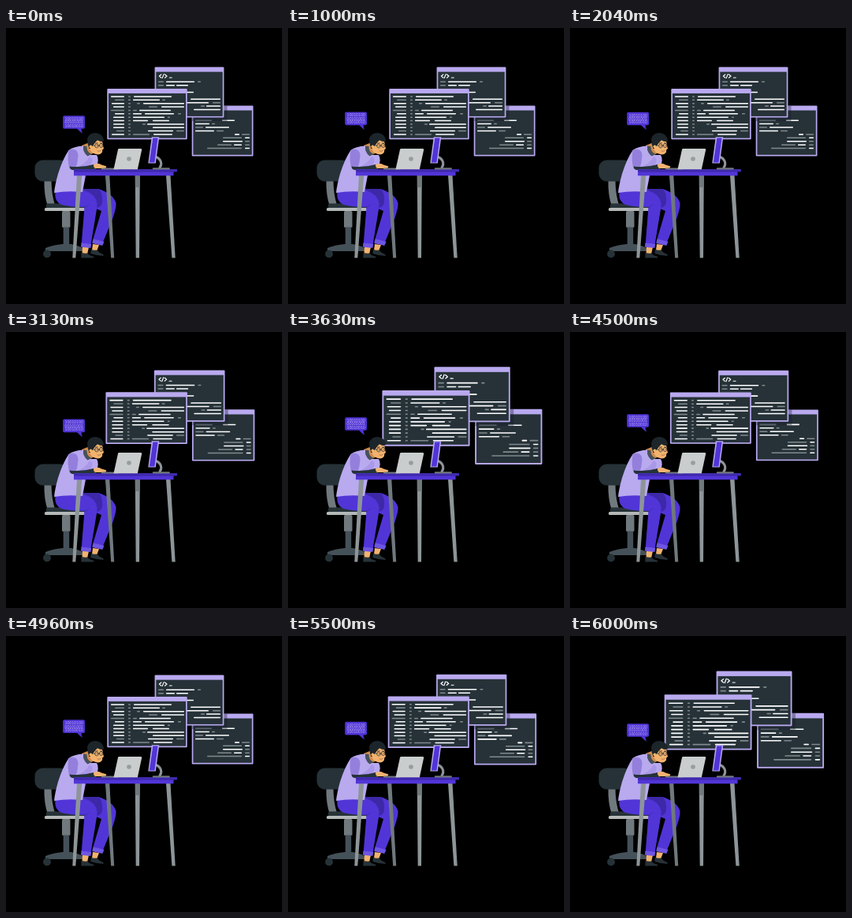
An HTML page with a canvas that plays this animation: 350 px wide and 350 px high, repeating every 6040 ms.

```html
<!DOCTYPE html>
<html lang="en">
<head>
<meta charset="utf-8">
<title>Coder at a desk</title>
<style>
  html, body { margin: 0; width: 100%; height: 100%; overflow: hidden; background: #000; }
  canvas { display: block; width: 350px; height: 350px; }
</style>
</head>
<body>
<canvas id="stage"></canvas>
<script>
const LOOP = 6040;
const canvas = document.getElementById('stage');
const ctx = canvas.getContext('2d');
const dpr = window.devicePixelRatio || 1;
canvas.width = canvas.height = Math.round(350 * dpr);

const C = {
  lilac: '#b9a9ef', lilacDark: '#9480dc', violet: '#5135d7', violetDark: '#3d28a8',
  dark: '#263238', slate: '#455159', steel: '#70797d', grey: '#8d9598',
  pale: '#c9cdcd', skin: '#f2b36e', skinDark: '#d28c50', hair: '#1c252a',
  white: '#ffffff', dim: '#80898d'
};

function shape(path, color) {
  ctx.fillStyle = color;
  ctx.fill(new Path2D(path));
}

function stroke(path, color, width) {
  ctx.strokeStyle = color;
  ctx.lineWidth = width;
  ctx.lineCap = ctx.lineJoin = 'round';
  ctx.stroke(new Path2D(path));
}

function box(x, y, w, h, r, color) {
  ctx.beginPath();
  ctx.roundRect(x, y, w, h, r);
  ctx.fillStyle = color;
  ctx.fill();
}

function dot(x, y, r, color) {
  ctx.beginPath();
  ctx.arc(x, y, r, 0, Math.PI * 2);
  ctx.fillStyle = color;
  ctx.fill();
}

// Each row lists dashes as "from-to"; a leading "g" makes the dash grey.
function dashes(rows, top, step) {
  rows.forEach((row, i) => {
    const y = top + i * step;
    for (const part of row.split(' ').filter(Boolean)) {
      const grey = part[0] === 'g';
      const [a, b] = part.replace('g', '').split('-').map(Number);
      stroke(`M${a + .7} ${y}H${b - .7}`, grey ? C.dim : C.white, 1.5);
    }
  });
}

function pane(x, y, w, h) {
  box(x, y, w, h, 1, C.lilac);
  ctx.fillStyle = C.dark;
  ctx.fillRect(x + 1.7, y + 6, w - 3.4, h - 7.7);
}

const listing = [
  '133-150 162-210',
  'g138-150 161-195 g198-202',
  '134-150 g166-170 174-226',
  '136-150 g181-192 197-226',
  'g133-150 g161-166 169-209',
  '138-150 161-172 176-213 g218-222',
  '136-150 161-201 g205-208',
  '136-150 161-180 186-207',
  '136-150 g173-177 179-226',
  '136-150 186-226',
  'g140-150 180-212 g216-226',
  '134-150 g161-182 187-211'
].map(row => row + ' g155-158');

const markup = [
  'g193-200 203-239 g243-247',
  'g193-200 203-214 216-231',
  '',
  '203-238',
  '',
  '234-272',
  '220-257 g262-272',
  'g247-252 254-272',
  '238-272'
];

const output = [
  'g240-261 274-290',
  '240-258 g261-265',
  'g240-250 253-283',
  '240-264 g267-276',
  'g290-296 g299-309 290-296',
  'g275-299 303-309',
  '275-300 g303-309',
  'g268-286 289-299 g303-309',
  'g255-299 303-309'
];

function drawPanes(scale) {
  ctx.save();
  ctx.translate(221, 106);
  ctx.scale(scale, scale);
  ctx.translate(-221, -106);

  pane(235.7, 98.5, 77.8, 64);
  dashes(output, 117.2, 4.42);
  ctx.fillStyle = 'rgba(20,24,40,.35)';
  ctx.fillRect(236, 98.5, 44.5, 19.5);

  pane(188.6, 49.6, 87.8, 64);
  stroke('M196.8 59l-2.4 2l2.4 2M201.6 59l2.4 2l-2.4 2M200.1 58.6l-1.8 4.8', C.white, 1.2);
  stroke('M207.3 63h3', C.white, 1);
  dashes(markup, 68.3, 4.4);

  pane(128.3, 76.9, 101.4, 64.4);
  dashes(listing, 87, 4.36);
  ctx.restore();
}

function drawBubble(dy) {
  ctx.save();
  ctx.translate(0, dy);
  box(72.2, 111.2, 27.8, 16.6, 1.8, C.violet);
  shape('M89.5 127Q93 131 97 133.8Q95.3 130.5 95.6 127Z', C.violet);
  ctx.fillStyle = C.lilac;
  ctx.font = '5px Lato, sans-serif';
  ctx.textAlign = 'center';
  ctx.textBaseline = 'alphabetic';
  ['10010100', '00101001', '10010010'].forEach((s, i) => ctx.fillText(s, 86.1, 117 + i * 4.35));
  ctx.restore();
}

function drawChair() {
  shape('M48.5 192H57.5Q57.5 211 62.5 226H53Q48 212 48.5 192Z', C.steel);
  box(36.5, 167.5, 42, 27, 10, C.dark);
  box(51, 222.5, 49, 6, 2, C.dark);
  box(49, 228, 51, 4, 1.5, '#b4b8b8');
  box(71, 232, 10.5, 21, 1.5, C.steel);
  box(72.7, 252.5, 7.5, 23, 0, C.slate);
  shape('M50 283V279Q60 275 72 274H82Q92 276 97 279V283Z', C.slate);
  dot(52, 286.5, 4.9, C.dark);
}

function drawLegs() {
  // far leg
  shape('M110 274L109 282L115 283L118 275Z', C.skin);
  shape('M108 280.5Q111 282.5 115 281.5Q118 285 123.5 287.3V289Q116 289 107.3 286Z', C.dark);
  shape('M94 204H117Q136 210 139.5 222Q140 228 135 242L122 274L109.5 271L121 232L98 222Z', C.violet);
  shape('M95 204H118Q123 211 122 221Q121 227 115 228L98 219Z', C.violetDark);
  shape('M110.8 267.5L124.5 271L122.3 276L109.2 273Z', '#6e55e3');
  // near leg
  shape('M97 277L96.5 287H103L105 278Z', C.skin);
  shape('M95.5 284.5Q99 286.5 103 285.5Q106 289 111.3 289.8V291.5H95.3Z', C.dark);
  shape('M63 205Q82 201 99 206Q117 212 115.5 227L107 278L95.5 276.5L99.5 227Q80 227 70 224Q60 219 63 205Z', C.violet);
  stroke('M99.5 227Q103 226 105 224', C.violetDark, .7);
  shape('M95.4 272.5L108.3 274L107.3 279L95 277.8Z', '#6e55e3');
}

function drawBody() {
  // neck
  shape('M96 149L106 145L112 158L103 163Z', C.skinDark);
  // shirt
  shape('M98 149.5Q86 150 79.5 155Q72 166 66 185Q62 199 61 209Q78 206 97 208L101 187L114 178Q119 167 115 161L104 161Q97 157 98 149.5Z', C.lilac);
  shape('M98 149.5Q97.5 158 103.5 162.5L108.5 160Q102 157.5 102.5 150Z', C.slate);
  shape('M79.5 155Q90 151 91.5 161Q91 171 88.5 177L80 176Q77.5 166 79.5 155Z', C.lilacDark);
  shape('M106 163Q113 166 107 174L92 180L90 177Q101 172 106 163Z', '#aa98e8');
  // sleeve and hand
  shape('M80.5 175.5Q96 177.5 111 173L115 178L109 180H84Q80.5 179 80.5 175.5Z', C.dark);
  shape('M111 173.3Q117 170.8 121 173.5L127 175.3Q127.8 177.4 125 178H113Q110.5 176 111 173.3Z', C.skin);
}

function drawHead() {
  shape('M104 146Q108 140 118 141Q123 142 123 149L124 153L122.3 154.2Q122.6 160 116.5 160.4Q109 160 106.5 154Z', C.skin);
  shape('M105.5 153Q103 146 103 141Q105 132.8 114 133Q123 134 124.2 143Q120.5 145.5 116 142.3Q112.5 145.5 111 148L109.3 150L107.6 148.2L107 153Z', C.hair);
  dot(107.5, 150.5, 2, C.skin);
  ctx.strokeStyle = C.hair;
  ctx.lineWidth = .7;
  for (const [x, y] of [[115, 149.5], [120.8, 149]]) {
    ctx.beginPath();
    ctx.ellipse(x, y, 2.3, 2.5, -.2, 0, Math.PI * 2);
    ctx.stroke();
    dot(x + .3, y, .6, C.hair);
  }
  stroke('M108.5 148.7L112.8 149.2M117.2 149.2L118.6 149M113.4 146.2L116.3 145.8M119.6 145.9L122 146.1', C.hair, .7);
  stroke('M116 156Q118.5 157 120.3 155.4', '#8a4c32', .6);
}

function drawDesk() {
  shape('M90 187H96.2L88.3 291.5H84.3Z', C.grey);
  shape('M126 187H131.3L137.2 291.5H133.2Z', C.steel);
  shape('M163.8 187H169.8L169 291.5H164.7Z', C.grey);
  shape('M163.8 187H169.8V202H163.8Z', C.steel);
  shape('M203 187H208.5L214.7 291.5H210.4Z', C.grey);
  box(86, 182, 126.5, 5.2, .5, C.violet);
  box(86, 179.3, 131, 3.2, 1, C.violetDark);
  box(86, 179.3, 131, 1, .5, '#4a30c4');
}

function drawDevices() {
  // monitor and stand
  stroke('M189 163Q195 165 196.5 170Q197.5 174 195 177', C.grey, 3);
  box(185.8, 177.3, 22, 2.2, 1, C.steel);
  shape('M184.8 138.2H194.3L189.8 171.6H180.3Z', C.lilac);
  shape('M186.3 139.4H192.6L188.5 170.5H181.8Z', C.violet);
  // laptop
  box(121, 177.6, 22, 1.9, .8, C.steel);
  shape('M143.5 153H171Q172.5 153 172.2 154.5L166.8 179.3H136.5L142 154.3Q142.3 153 143.5 153Z', C.pale);
  dot(156, 166, 2.8, '#969d9e');
}

// Linear swell to 1.1, slower return, then a rest.
function pulse(t) {
  if (t < 3000) return 1;
  const p = (t - 3000) % 2390;
  if (p < 660) return 1 + .1 * p / 660;
  return 1 + .1 * Math.max(0, 1 - (p - 660) / 990);
}

function float(t) {
  const p = (t % 3000) / 3000;
  return -7 * (1 - Math.abs(2 * p - 1));
}

function draw(t) {
  ctx.setTransform(dpr, 0, 0, dpr, 0, 0);
  ctx.fillStyle = '#000';
  ctx.fillRect(0, 0, 350, 350);
  drawPanes(pulse(t));
  drawBubble(float(t));
  drawChair();
  drawLegs();
  drawBody();
  drawHead();
  drawDesk();
  drawDevices();
}

const start = performance.now();
function tick() {
  draw((performance.now() - start) % LOOP);
  requestAnimationFrame(tick);
}
tick();
</script>
</body>
</html>
```
